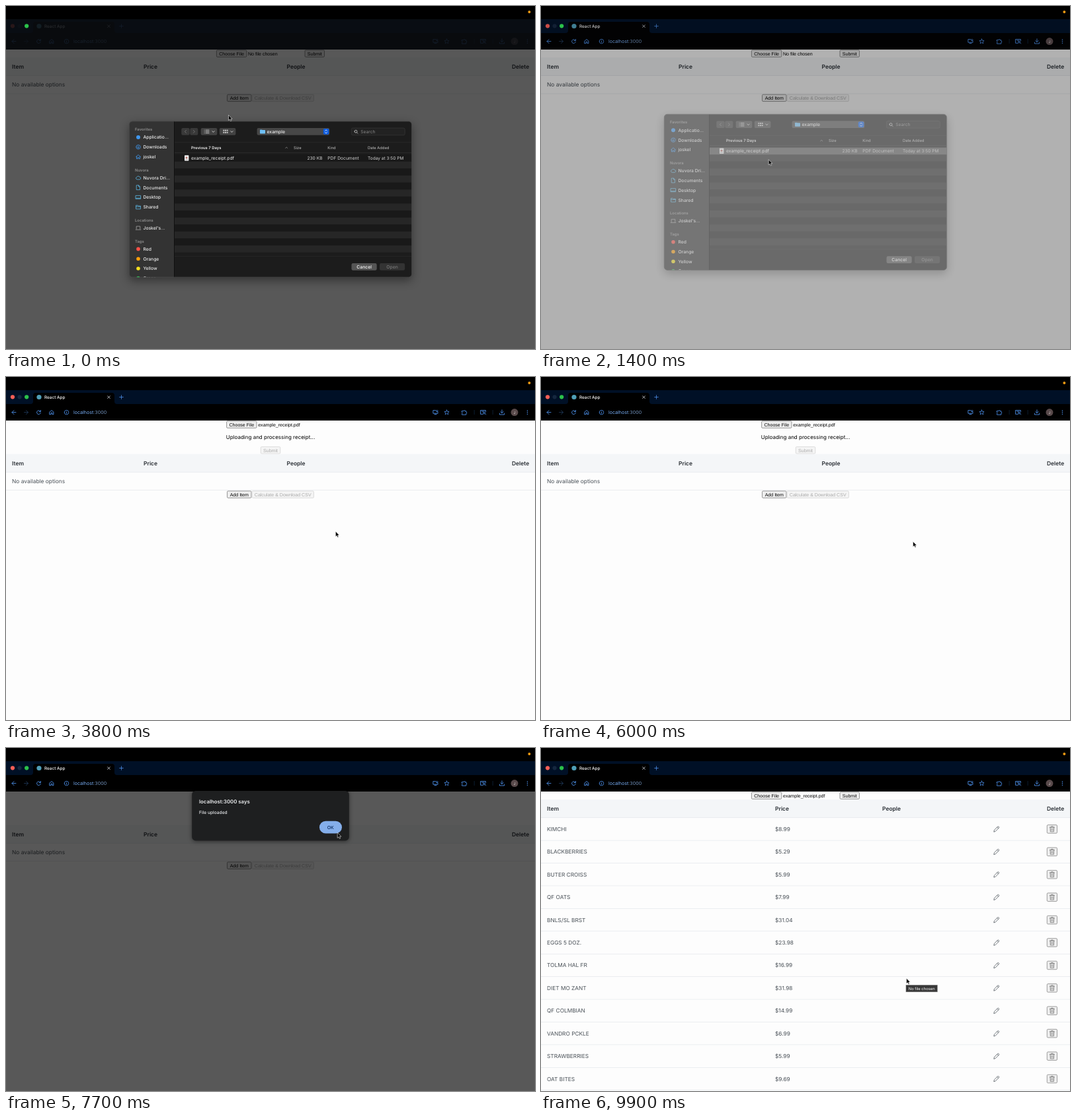
These frames come from a looping animation (800 px wide and 520 px high, 10 s). An HTML page:

```html
<!DOCTYPE html>
<html lang="en">
<head>
<meta charset="utf-8">
<title>Receipt upload</title>
<style>
html, body { margin: 0; width: 100%; height: 100%; overflow: hidden; background: #000; }
svg { display: block; text-rendering: geometricPrecision; }
text { white-space: pre; }
#sheet { filter: drop-shadow(0 5px 7px rgba(0, 0, 0, .4)); }
#alert { filter: drop-shadow(0 1px 3px rgba(0, 0, 0, .5)); }
</style>
</head>
<body>
<svg id="stage" width="800" height="520" viewBox="0 0 800 520"></svg>
<script>
const INTER = 'Inter, sans-serif', ARIAL = 'Liberation Sans, Arial, sans-serif';
const BLUE = '#4c8fe8', SIDE_BLUE = '#3f97ee';
const DURATION = 10000, STEP = 100;

// Markup helpers; text is centred vertically on y.
const text = (x, y, str, size, fill, { weight = 400, anchor = 'start', font = INTER, id = '' } = {}) =>
  `<text id="${id}" x="${x}" y="${y + size * .36}" font-size="${size}" fill="${fill}" font-weight="${weight}"
    text-anchor="${anchor}" font-family="${font}">${str}</text>`;
const box = (x, y, w, h, fill, r = 0, extra = '') =>
  `<rect x="${x}" y="${y}" width="${w}" height="${h}" rx="${r}" fill="${fill}" ${extra}/>`;
const dot = (x, y, r, fill) => `<circle cx="${x}" cy="${y}" r="${r}" fill="${fill}"/>`;
const icon = (x, y, d, stroke, width = .9) =>
  `<path transform="translate(${x} ${y})" d="${d}" fill="none" stroke="${stroke}" stroke-width="${width}"
    stroke-linecap="round" stroke-linejoin="round"/>`;
const group = (id, ...parts) => `<g id="${id}">${parts.join('')}</g>`;
const ring = r => `M${-r} 0a${r} ${r} 0 1 0 ${2 * r} 0a${r} ${r} 0 1 0 ${-2 * r} 0`;

function button(x, y, w, label, disabled) {
  const border = `stroke="${disabled ? '#cfcfcf' : '#6f6f6f'}" stroke-width=".7"`;
  return box(x, y, w, 10.4, disabled ? '#f5f5f5' : '#efefef', 1.4, border) +
    text(x + w / 2, y + 5.3, label, 7.05, disabled ? '#a9a9a9' : '#000', { anchor: 'middle', font: ARIAL });
}

function tableHead(priceX, peopleX) {
  const cells = [[9, 'Item'], [priceX, 'Price'], [peopleX, 'People'], [765, 'Delete']];
  return box(0, 78, 800, 27.5, '#f4f6f8') + rule(105.5) +
    cells.map(([x, s]) => text(x, 91.8, s, 8.47, '#2b3036', { weight: 600 })).join('');
}
const rule = y => box(0, y - .3, 800, .6, '#dfe3e8');

function browser() {
  const chevron = 'M3 0H-3M0 -3L-3 0L0 3';
  return group('browser',
    box(0, 20, 800, 21, '#001026'),
    '<path d="M37 41Q41 41 41 37V28Q41 24 45 24H160Q164 24 164 28V37Q164 41 168 41Z"/>',
    dot(10, 30.3, 3.1, '#ff5f57'), dot(20.6, 30.3, 3.1, '#14273f'),
    dot(50, 30.5, 3.6, '#4f9fb8'),
    text(58, 30.7, 'React App', 6.4, '#fff', { weight: 500 }),
    icon(155.5, 30.6, 'M-1.8 -1.8L1.8 1.8M1.8 -1.8L-1.8 1.8', '#e8edf5', .8),
    icon(174.5, 30.5, 'M-2.8 0H2.8M0 -2.8V2.8', BLUE, .8),
    icon(12, 53.6, chevron, BLUE),
    icon(30.5, 53.6, 'M-3 0H3M0 -3L3 0L0 3', '#1f3858'),
    icon(49.5, 53.6, 'M2.6 -1.2A2.9 2.9 0 1 0 2.8 .9M2.9 -3.2V-1H.8', BLUE),
    icon(69, 53.6, 'M-2.9 -.6L0 -3.1L2.9 -.6V3.1H.9V.7H-.9V3.1H-2.9Z', BLUE),
    icon(91.5, 53.6, ring(3.3) + 'M0 -.2V1.6M0 -1.7V-1.6', BLUE, .8),
    text(102, 53.7, 'localhost<tspan fill="#6f8fb8">:3000</tspan>', 7.1, '#78aef5'),
    icon(649.5, 53.4, 'M.4 -2.8H-3.6V1.8H3.6V.2M-1.5 3.2H1.5M2.4 -3.2V-.6M1 -1.8L2.4 -.4L3.8 -1.8', BLUE),
    icon(666.5, 53.6, 'M0 -3.6L1.1 -1.2L3.6 -1L1.7 .7L2.3 3.2L0 1.9L-2.3 3.2L-1.7 .7L-3.6 -1L-1.1 -1.2Z', BLUE, .8),
    icon(693, 53.8, 'M-3.4 -2.2H-1A1 1 0 0 1 1 -2.2H2.8V-.6A1 1 0 0 1 2.8 1.4V3.4H-3.4V1.5A1.1 1.1 0 0 0 -3.4 -.5Z', BLUE),
    box(707.8, 50, .6, 7, '#13304f'), box(735.8, 50, .6, 7, '#13304f'),
    icon(721.5, 53.5, 'M0 2.8H-3.9V-3H3.9V-.8M-1.8 -1.2H1.6' + 'M.5 1a1.3 1.3 0 1 0 2.6 0a1.3 1.3 0 1 0 -2.6 0M2.8 2L4.2 3.4', BLUE),
    icon(750, 53.5, 'M0 -3.7V1M-2.2 -1L0 1.2L2.2 -1M-3.6 1.6V3.5H3.6V1.6', BLUE),
    dot(769, 53.6, 5.5, '#594a4b'),
    text(769, 53.6, 'J', 5.4, '#e0d8d8', { anchor: 'middle' }),
    [-2.7, 0, 2.7].map(dy => dot(788.5, 53.6 + dy, .75, BLUE)).join(''));
}

const items = [
  ['KIMCHI', '8.99'], ['BLACKBERRIES', '5.29'], ['BUTER CROISS', '5.99'], ['QF OATS', '7.99'],
  ['BNLS/SL BRST', '31.04'], ['EGGS 5 DOZ.', '23.98'], ['TOLMA HAL FR', '16.99'], ['DIET MO ZANT', '31.98'],
  ['QF COLMBIAN', '14.99'], ['VANDRO PCKLE', '6.99'], ['STRAWBERRIES', '5.99'], ['OAT BITES', '9.69']];

function itemRow([name, price], i) {
  const y = 122.9 + i * 34.42, ink = '#495057';
  return text(9, y, name, 8.3, ink) + text(354, y, '$' + price, 8.3, ink) + rule(y + 17.2) +
    icon(688.8, y, 'M-3.9 3.9L-3.3 1.4L1.9 -3.7Q2.7 -4.3 3.5 -3.5Q4.3 -2.7 3.7 -1.9L-1.4 3.3ZM1 -2.8L2.8 -1', '#495057', .75) +
    box(765.3, y - 6.3, 15.2, 12.6, '#efefef', 1.4, 'stroke="#777" stroke-width=".7"') +
    icon(772.9, y, 'M-3.6 -2.7H3.6M-1.3 -2.7V-4H1.3V-2.7M-2.9 -2.7L-2.5 4H2.5L2.9 -2.7M-1 -.9V2.3M1 -.9V2.3', '#666', .7);
}

function page() {
  return box(0, 66, 800, 454, '#fdfdfd') +
    group('picker', button(318.4, 66.9, 45.4, 'Choose File'),
      text(366, 72.2, '', 7.05, '#000', { font: ARIAL, id: 'fileName' })) +
    group('ready', button(452, 66.9, 29.5, 'Submit')) +
    group('busy', text(400, 91.6, 'Uploading and processing receipt...', 8, '#000', { anchor: 'middle' }),
      button(385.3, 105.8, 29.5, 'Submit', true)) +
    group('empty', tableHead(208, 424.5), text(9, 119.4, 'No available options', 8.4, '#495057'), rule(133),
      button(334.5, 134.2, 36.5, 'Add Item'), button(372, 134.2, 93.4, 'Calculate &amp; Download CSV', true)) +
    group('items', tableHead(354, 516), items.map(itemRow).join(''));
}

const folder = 'M-3.4 2.6V-2.6H-.8L0 -1.7H3.4V2.6Z';
const sidebar = [
  [187, 'Favorites'],
  [199, 'Applicatio...', ''], [213.8, 'Downloads', ring(3.2) + 'M0 -1.6V1.5M-1.3 .3L0 1.6L1.3 .3'],
  [228.6, 'joskel', 'M-3.4 0L0 -3L3.4 0M-2.5 -.5V3H-.8V1H.8V3H2.5V-.5'],
  [248.7, 'Nuvora'],
  [260.4, 'Nuvora Dri...', 'M-2 2.5A1.8 1.8 0 0 1 -2.2 -1A2.4 2.4 0 0 1 2 -1.2A1.9 1.9 0 0 1 2.4 2.5Z'],
  [275.2, 'Documents', 'M-2.4 -3.4H.6L2.5 -1.4V3.4H-2.4ZM.5 -3.3V-1.3H2.4'],
  [290, 'Desktop', 'M-3.6 -2.6H3.6V2.4H-3.6ZM-3.4 1.3H3.4'],
  [304.8, 'Shared', folder + 'M-3.4 -.6H3.4'],
  [325, 'Locations'], [336.6, 'Joskel\'s...', 'M-2.8 1.4V-2.6H2.8V1.4M-3.8 2.5H3.8'],
  [356.6, 'Tags'],
  [368.4, 'Red', '#ff5147'], [383.2, 'Orange', '#ff9f0a'], [398, 'Yellow', '#f6e020'], [412.6, 'Green', '#30d158']];

function sidebarRow([y, label, mark]) {
  if (mark === undefined) return text(195, y, label, 5.9, '#8e8e8e', { weight: 600 });
  const symbol = !mark ? dot(200, y, 3, SIDE_BLUE)
    : mark[0] === '#' ? dot(200, y, 2.8, mark)
    : icon(200, y, mark, label === 'Joskel\'s...' ? '#a5a5a5' : y < 240 ? SIDE_BLUE : '#5cb6e4', .8);
  return symbol + text(207.5, y, label, 6.75, '#eee', { weight: 500 });
}

function fileSheet() {
  const stripes = Array.from({ length: 14 }, (_, i) => box(255, 225.3 + i * 10.6, 359, 10.6, i % 2 ? '#262626' : '#191919'));
  const down = 'M-1.6 -.8L0 .8L1.6 -.8', white = '#f2f2f2';
  return `<clipPath id="round"><rect x="186.3" y="174.8" width="427.4" height="236.4" rx="5"/></clipPath>` +
    group('sheet', '<g clip-path="url(#round)">',
      box(186, 174, 428, 238, '#1c1c1c'), box(186, 174, 68.5, 238, '#333'), box(254.3, 174, .7, 238, '#080808'),
      sidebar.map(sidebarRow).join(''),
      box(265.3, 185, 12.3, 10.8, '#393939', 2), box(278.3, 185, 12, 10.8, '#393939', 2),
      icon(271.4, 190.4, 'M1 -2L-1 0L1 2', '#777'), icon(284.4, 190.4, 'M-1 -2L1 0L-1 2', '#777'),
      box(294.7, 185, 24.6, 10.8, '#424242', 2), box(322.8, 185, 24.6, 10.8, '#424242', 2),
      icon(303.5, 190.4, 'M-1.4 -2.2H3.5M-1.4 0H3.5M-1.4 2.2H3.5M-3.4 -2.2H-3.3M-3.4 0H-3.3M-3.4 2.2H-3.3', '#ddd', .8),
      icon(313.5, 190.5, down, '#ddd'), icon(341.5, 190.5, down, '#ddd'),
      [-2.7, 0, 2.7].flatMap(dx => [-2.4, .8].map(dy => box(331 + dx, 190 + dy, 2, 2, '#c8c8c8'))).join(''),
      box(379.6, 185, 109.6, 10.8, '#474747', 2.2),
      box(384, 187.4, 3.5, 2, '#5fb5ee', .5), box(384, 188, 8, 5.4, '#6fc0f5', .7),
      text(394.5, 190.5, 'example', 6.8, white, { weight: 500 }),
      box(479.8, 186, 8.6, 8.8, '#0b5be0', 2),
      icon(484.1, 190.4, 'M-1.5 -1.1L0 -2.6L1.5 -1.1M-1.5 1.1L0 2.6L1.5 1.1', '#fff', .8),
      box(522.3, 185, 81, 10.8, '#222', 2.2, 'stroke="#3b3b3b" stroke-width=".6"'),
      icon(529, 190.2, ring(2) + 'M1.5 1.5L3 3', '#ccc', .8),
      text(536.3, 190.6, 'Search', 6.7, '#888'),
      box(255, 206.6, 359, .5, '#303030'), box(255, 222, 359, .5, '#383838'),
      text(280, 214.7, 'Previous 7 Days', 5.9, white, { weight: 600 }),
      icon(424.2, 214.8, 'M-1.6 .7L0 -.8L1.6 .7', '#999', .7),
      text(435, 214.7, 'Size', 5.8, '#c4c4c4'), text(486.3, 214.7, 'Kind', 5.8, '#c4c4c4'),
      text(547, 214.7, 'Date Added', 5.8, '#c4c4c4'),
      ...stripes,
      '<rect id="selection" x="255" y="225.3" width="359" height="10.6"/>',
      box(270, 226.3, 6.4, 8.4, '#eee', .7), dot(273, 230, 1.5, '#b9706a'), box(271, 232.6, 4.4, .8, '#aaa'),
      text(280, 230.7, 'example_receipt.pdf', 6.75, white),
      text(478.6, 230.7, '230 KB', 6.7, '#d2d2d2', { anchor: 'end' }),
      text(486.3, 230.7, 'PDF Document', 6.7, '#d2d2d2'),
      text(547, 230.7, 'Today at 3:50 PM', 6.55, '#d2d2d2'),
      box(255, 374, 359, 38, '#1c1c1c'), box(255, 379, 359, .5, '#2c2c2c'),
      box(522.5, 390, 38.2, 10.8, '#555', 2.4), text(541.6, 395.5, 'Cancel', 6.8, '#fff', { anchor: 'middle', weight: 500 }),
      '<rect id="open" x="565" y="390" width="38.2" height="10.8" rx="2.4"/>',
      text(584.1, 395.5, 'Open', 6.8, '#777', { anchor: 'middle', weight: 500, id: 'openLabel' }),
      '</g>',
      box(186.3, 174.8, 427.4, 236.4, 'none', 5, 'stroke="#555" stroke-width=".7"'));
}

const alertBox = () => group('alert',
  box(281.2, 65, 237.6, 75.4, '#1e1f20', 5.5),
  text(292, 81.4, 'localhost:3000 says', 7.8, '#eceef0', { weight: 600 }),
  text(292, 97.3, 'File uploaded', 6.65, '#eceef0', { weight: 500 }),
  box(474, 110.8, 34, 18.8, '#84aeea', 9.4),
  text(490.8, 120.6, 'OK', 6.9, '#0b2c61', { anchor: 'middle', weight: 500 }));

stage.innerHTML =
  box(0, 0, 800, 520, '#000') + dot(791.4, 9, 2, '#f29a12') + browser() + page() +
  '<rect id="pageShade" y="66" width="800" height="454"/>' +
  '<rect id="barShade" y="20" width="800" height="46" fill="#0b0d11"/>' +
  dot(31.2, 30.3, 3.1, '#2bc24a') + fileSheet() + alertBox() +
  group('tip', box(552, 359.4, 47.4, 10.4, '#383838', 0, 'stroke="#777" stroke-width=".5"'),
    text(575.7, 364.7, 'No file chosen', 5.85, '#fff', { anchor: 'middle' })) +
  '<path id="pointer" d="M0 0V8.1L1.9 6.4L3.1 9.2L4.5 8.6L3.3 5.9H5.7Z" stroke="#fff" stroke-width=".55"/>';

// Pointer stops: time, x, y.
const stops = [
  [0, 336.5, 165.3], [700, 344.2, 232.8], [1500, 344.2, 232.8], [2200, 468, 72], [2800, 468, 72],
  [3500, 498.4, 234], [3800, 498.4, 234], [4500, 562.6, 249.4], [6600, 562.6, 249.4],
  [7500, 501.2, 128.3], [7800, 501.2, 128.3], [8700, 552.7, 349.2], [DURATION, 552.7, 349.2]];

const clamp = v => Math.max(0, Math.min(1, v));
const byId = id => document.getElementById(id);
const set = (id, name, value) => byId(id).setAttribute(name, value);
const show = (id, opacity) => set(id, 'opacity', +opacity);

function pointerAt(t) {
  const i = stops.findIndex(s => s[0] > t);
  const [t0, x0, y0] = stops[i - 1], [t1, x1, y1] = stops[i];
  const p = (t - t0) / (t1 - t0), k = p * p * (3 - 2 * p);
  return `translate(${x0 + (x1 - x0) * k} ${y0 + (y1 - y0) * k})`;
}

function render(t) {
  const sheet = clamp((1500 - t) / 200);
  const busy = t >= 2900 && t < 7800, done = t >= 7800;
  const alert = t >= 6600 && !done ? clamp((t - 6500) / 200) : 0;
  const selected = t >= 1100 && t < 1400;

  show('sheet', sheet < 1 ? sheet * .94 : 1);
  set('sheet', 'transform', `translate(0 ${-21.4 * (1 - sheet)})`);
  set('selection', 'fill', selected ? '#0a50d6' : t < 1100 ? 'none' : '#5a5a5a');
  set('open', 'fill', selected ? '#0a55d8' : '#333');
  set('openLabel', 'fill', selected ? '#fff' : '#777');

  byId('fileName').textContent = t < 1500 ? 'No file chosen' : 'example_receipt.pdf';
  set('picker', 'transform', `translate(${busy ? 15.2 : 0} 0)`);
  show('ready', !busy);
  show('busy', busy);
  show('empty', !done);
  set('empty', 'transform', `translate(0 ${busy ? 38.7 : 0})`);
  show('items', done);

  show('pageShade', .65 * Math.max(sheet, alert) - (sheet % 1 ? .025 : 0));
  show('barShade', .88 * sheet * sheet);
  show('alert', alert);
  show('tip', clamp((t - 9400) / 300));
  set('pointer', 'transform', pointerAt(t));
}

function frame(now) {
  render(Math.floor(now % DURATION / STEP) * STEP);
  requestAnimationFrame(frame);
}
render(0);
requestAnimationFrame(frame);
</script>
</body>
</html>
```
